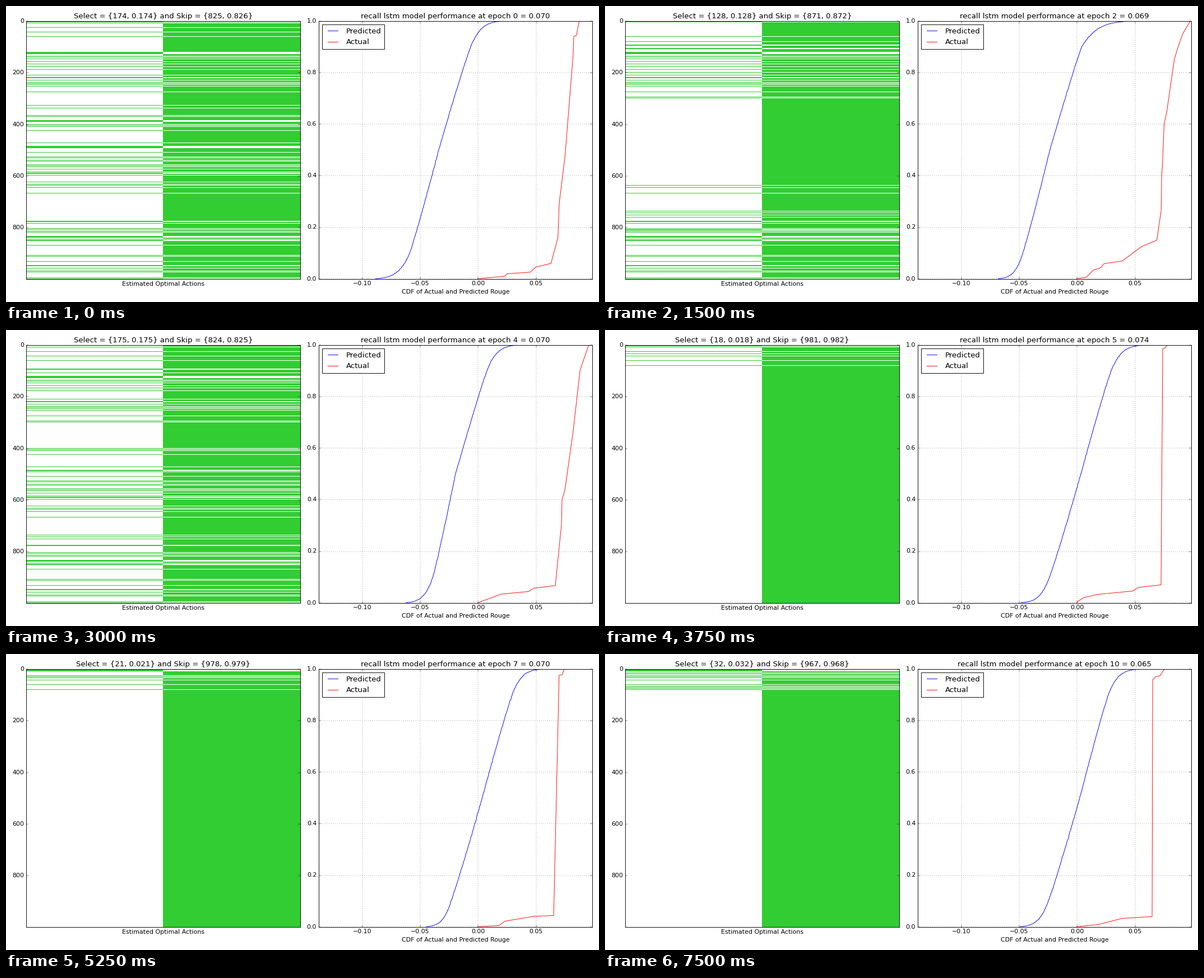
These frames come from a looping animation (1058x529 px, 8 s). A matplotlib script:

```python
import matplotlib.pyplot as plt
import numpy as np
from matplotlib.animation import FuncAnimation
from matplotlib.colors import ListedColormap

W, H, DPI = 1058, 529, 66.125
TOP, BOTTOM, PANEL_W = 26.7, 487.7, 488.4
ROWS = 999
STEP_MS, STEPS_PER_EPOCH, STEPS = 250, 3, 32

plt.style.use("classic")
plt.rcParams.update({
    "figure.facecolor": "white",
    "savefig.dpi": "figure",
    "font.family": "DejaVu Sans",
})

LEVELS = np.array([.001, .1, .5, .9, .999])
GRID = np.linspace(.001, .999, 999)
RANK = np.random.default_rng(12).random(ROWS)


def warp(q, power):
    """Tukey lambda scale: near normal at .14, near uniform at .7."""
    return q ** power - (1 - q) ** power


def predicted_curve(keys, seed):
    """Flat middle with bell-shaped tails through x at LEVELS."""
    middle, tail = (np.interp(warp(GRID, p), warp(LEVELS, p), keys)
                    for p in (.7, .14))
    x = np.where(abs(GRID - .5) < .4, middle, tail)
    x += np.random.default_rng(seed).normal(0, .25, GRID.size)
    return np.sort(x) / 1000


def epoch_data(count, score, bands, keys, corners):
    """Curve x values are in thousandths, corner heights in percent."""
    x, percent = np.array(corners).T
    return dict(count=count, score=score, bands=bands,
                predicted=predicted_curve(keys, count),
                actual=np.interp(GRID, percent / 100, x) / 1000)


def between(a, b, t):
    mixed = {k: (1 - t) * a[k] + t * b[k]
             for k in ("count", "score", "predicted", "actual")}
    return dict(mixed, count=round(mixed["count"]), bands=a["bands"])


HEAD = [(0, 82)]
epochs = {
    0: epoch_data(
        174, .070, [(0, 90), (120, 285), (325, 680), (705, 725), (760, ROWS)],
        [-88.7, -59, -34, -6.4, 21],
        [(0, .1), (23, 1), (25, 2), (45, 2.6), (50, 4.6), (63, 6), (69, 16),
         (70, 29), (75, 47), (82, 86), (82.7, 94), (85, 94.5), (87.4, 100)]),
    1: epoch_data(
        112, .069, [(0, 4), (55, 303), (635, ROWS)],
        [-69.8, -49.5, -24.8, 2.8, 50],
        [(0, .1), (9.5, .6), (14.5, 6), (30, 7), (52, 12.6), (69, 15),
         (73, 26), (73.5, 60), (76, 64.5), (83, 85), (91, 95), (98.7, 100)]),
    3: epoch_data(
        50, .076, [(0, 4), (635, ROWS)],
        [-60, -29, 3.3, 35.7, 64],
        [(0, .1), (6.2, .6), (11.2, 63.7), (50, 66.4), (75.5, 70.3),
         (80, 76), (81.3, 90), (86, 100)]),
    4: epoch_data(
        175, .070, [(0, 303), (398, ROWS)],
        [-62.5, -39, -19.5, 7.7, 34],
        [(0, .1), (20, 3.4), (43.5, 4.4), (48, 5.7), (66.7, 6.7), (72, 30),
         (72.5, 40), (75, 43.7), (82, 66), (88, 90), (95.6, 100)]),
    5: epoch_data(
        18, .074, HEAD,
        [-48.5, -23.8, 3.3, 29.4, 57],
        [(0, .4), (6, 2.1), (18, 3.3), (48, 4.6), (53, 6), (72.5, 7),
         (74, 98.6), (76, 98.8), (78, 100)]),
    7: epoch_data(
        21, .070, HEAD,
        [-44.7, -23.3, 3.5, 29.4, 55],
        [(0, .1), (18, .5), (23, 2.2), (48, 4.1), (65.3, 4.4), (70, 97.5),
         (72.5, 97.7), (74.5, 100)]),
    10: epoch_data(
        32, .065, HEAD,
        [-49.5, -24.8, 2.3, 27, 53],
        [(0, .1), (18, .9), (39, 3.3), (64.8, 4), (65.3, 95.8), (68, 97),
         (71.5, 97.3), (75.5, 100)]),
}
epochs[2] = between(epochs[1], epochs[4], .25)
epochs[6] = between(epochs[5], epochs[7], .5)
epochs[8] = between(epochs[7], epochs[10], 1 / 3)
epochs[9] = between(epochs[7], epochs[10], 2 / 3)


def stripes(data):
    """Select the best ranked rows inside the bands, skip the rest."""
    rank = np.full(ROWS, np.inf)
    for start, end in data["bands"]:
        rank[start:end] = RANK[start:end]
    chosen = np.zeros(ROWS)
    chosen[np.argsort(rank)[:data["count"]]] = 1
    return np.column_stack([chosen, 1 - chosen])


def panel(left):
    return fig.add_axes([left / W, 1 - BOTTOM / H, PANEL_W / W,
                         (BOTTOM - TOP) / H])


fig = plt.figure(figsize=(W / DPI, H / DPI), dpi=DPI)

actions = panel(36.2)
image = actions.imshow(stripes(epochs[0]), vmin=0, vmax=1, aspect="auto",
                       cmap=ListedColormap(["white", "limegreen"]),
                       interpolation="nearest")
actions.set_xticks([])
actions.set_yticks(range(0, 1000, 200))
actions.set_xlabel("Estimated Optimal Actions")
counts = actions.set_title("")

cdf = panel(557.7)
blue, = cdf.plot([], [], "b", label="Predicted")
red, = cdf.plot([], [], "r", label="Actual")
cdf.set_xlim(-.1378, .0987)
cdf.set_ylim(0, 1)
cdf.set_xticks([-.10, -.05, 0, .05])
cdf.grid(True)
cdf.set_xlabel("CDF of Actual and Predicted Rouge")
cdf.legend(loc="upper left")
score = cdf.set_title("")


def update(step):
    epoch = step // STEPS_PER_EPOCH
    data = epochs[epoch]
    n = data["count"]
    skip = ROWS - n
    counts.set_text(f"Select = {{{n}, {n / ROWS:.3f}}} and "
                    f"Skip = {{{skip}, {skip / ROWS:.3f}}}")
    score.set_text(f"recall lstm model performance at epoch {epoch} = "
                   f"{data['score']:.3f}")
    image.set_data(stripes(data))
    blue.set_data(data["predicted"], GRID)
    red.set_data(data["actual"], GRID)
    return image, blue, red, counts, score


anim = FuncAnimation(fig, update, frames=STEPS, interval=STEP_MS, repeat=True,
                     repeat_delay=0, blit=False)
plt.show()
```
